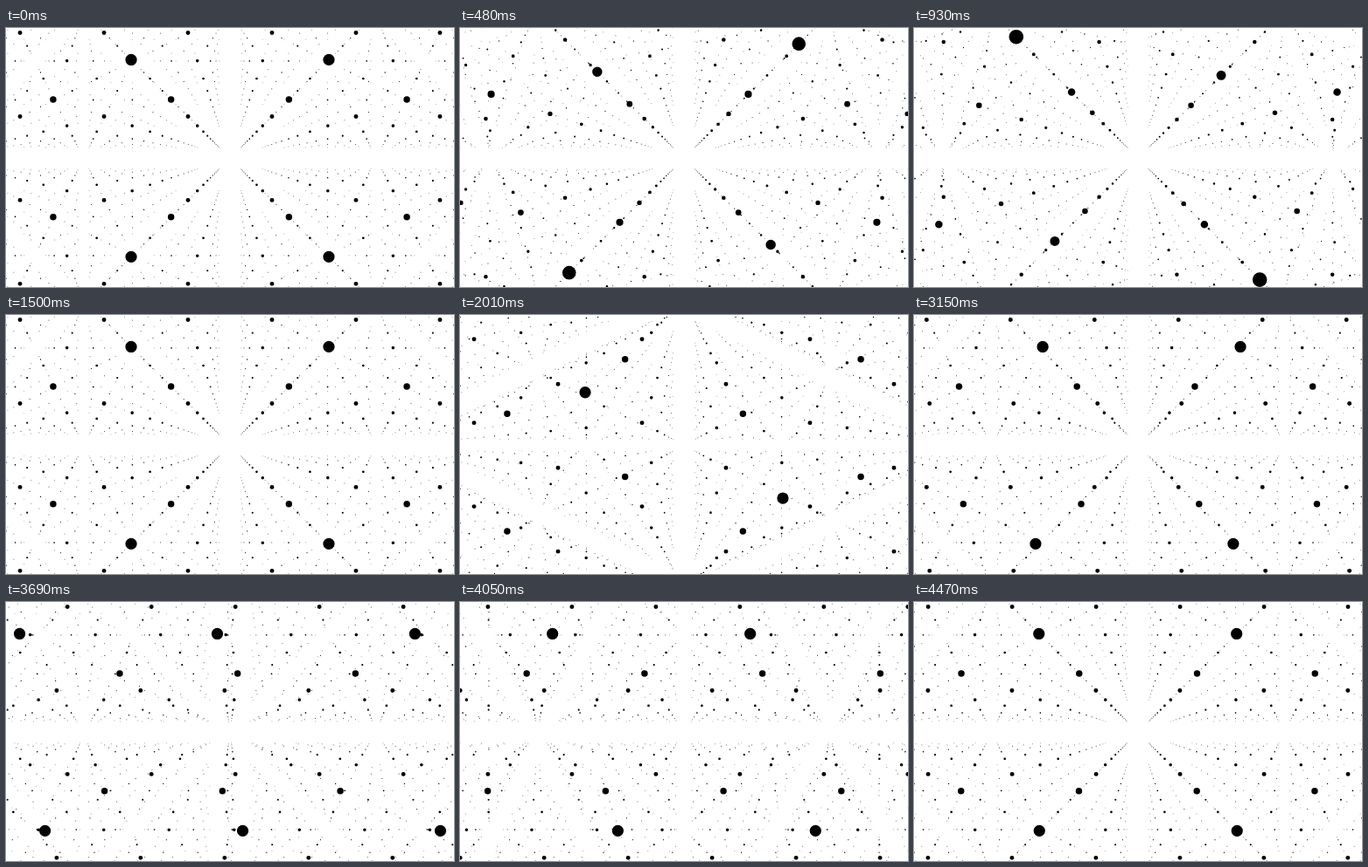
Animation, 512 px wide and 297 px high, one loop 4500 ms. Source, as an HTML page without scripts:

```html
<!DOCTYPE html>
<html lang="en">
<head>
<meta charset="utf-8">
<title>Sliding lattice</title>
<style>
  @property --slide-x { syntax: "<number>"; inherits: true; initial-value: 0; }
  @property --slide-y { syntax: "<number>"; inherits: true; initial-value: 0; }
  @property --slide-z { syntax: "<number>"; inherits: true; initial-value: 0; }

  html, body { margin: 0; width: 100%; height: 100%; overflow: hidden; background: #fff; }

  svg {
    --ease: linear(0, .0045 5%, .0177 10%, .042 15%, .0745 20%, .141 27%, .2305 34%,
      .327 40%, .4345 46%, .583 54%, .721 62%, .834 70%, .9226 78%, .965 84%, .987 90%, .997 95%, 1);
    display: block;
    width: 100vw;
    height: 100vh;
    animation: depth 4.5s var(--ease) infinite, vertical 4.5s var(--ease) infinite,
      horizontal 4.5s var(--ease) infinite;
  }

  /* One slide per axis; a whole cell of travel looks the same as none. */
  @keyframes depth {
    0% { --slide-z: 0; }
    33.333% { --slide-z: 1; }
    33.334%, 100% { --slide-z: 0; }
  }
  @keyframes vertical {
    0%, 33.333% { --slide-y: 0; }
    66.666% { --slide-y: 1; }
    66.667%, 100% { --slide-y: 0; }
  }
  @keyframes horizontal {
    0%, 66.667% { --slide-x: 0; }
    100% { --slide-x: 1; }
  }

  /* Neighbouring layers, columns and rows run in opposite directions. */
  .layers g { --side: -1; }
  .layers g:nth-child(even) { --side: 1; }
  .a { --col: 1; --row: 1; }
  .b { --col: -1; --row: 1; }
  .c { --col: 1; --row: -1; }
  .d { --col: -1; --row: -1; }

  /* Each path is a grid of round dots, two cells apart. */
  path {
    --z: max(.3, var(--n) + .477 + var(--col) * var(--row) * var(--slide-z));
    --x: calc(1px * (var(--side) * var(--row) * var(--slide-x) - .5 * var(--col)));
    --y: calc(1px * (var(--side) * var(--col) * var(--slide-y) - .5 * var(--row)));
    d: path("M-14-8h28.5M-14-6h28.5M-14-4h28.5M-14-2h28.5M-14 0h28.5M-14 2h28.5M-14 4h28.5M-14 6h28.5M-14 8h28.5");
    fill: none;
    stroke: #000;
    stroke-width: calc(.064px * (1 - var(--z) / 18));
    stroke-linecap: round;
    stroke-dasharray: 0 2;
    transform-origin: 0 0;
    transform: scale(calc(333.7 / var(--z))) translate(var(--x), var(--y));
  }
</style>
</head>
<body>
<svg viewBox="0 0 512 297">
  <g class="layers" transform="translate(256 149.4)">
    <g style="--n:0"><path class="a"/><path class="b"/><path class="c"/><path class="d"/></g>
    <g style="--n:1"><path class="a"/><path class="b"/><path class="c"/><path class="d"/></g>
    <g style="--n:2"><path class="a"/><path class="b"/><path class="c"/><path class="d"/></g>
    <g style="--n:3"><path class="a"/><path class="b"/><path class="c"/><path class="d"/></g>
    <g style="--n:4"><path class="a"/><path class="b"/><path class="c"/><path class="d"/></g>
    <g style="--n:5"><path class="a"/><path class="b"/><path class="c"/><path class="d"/></g>
    <g style="--n:6"><path class="a"/><path class="b"/><path class="c"/><path class="d"/></g>
    <g style="--n:7"><path class="a"/><path class="b"/><path class="c"/><path class="d"/></g>
    <g style="--n:8"><path class="a"/><path class="b"/><path class="c"/><path class="d"/></g>
    <g style="--n:9"><path class="a"/><path class="b"/><path class="c"/><path class="d"/></g>
    <g style="--n:10"><path class="a"/><path class="b"/><path class="c"/><path class="d"/></g>
    <g style="--n:11"><path class="a"/><path class="b"/><path class="c"/><path class="d"/></g>
    <g style="--n:12"><path class="a"/><path class="b"/><path class="c"/><path class="d"/></g>
    <g style="--n:13"><path class="a"/><path class="b"/><path class="c"/><path class="d"/></g>
  </g>
</svg>
</body>
</html>
```
